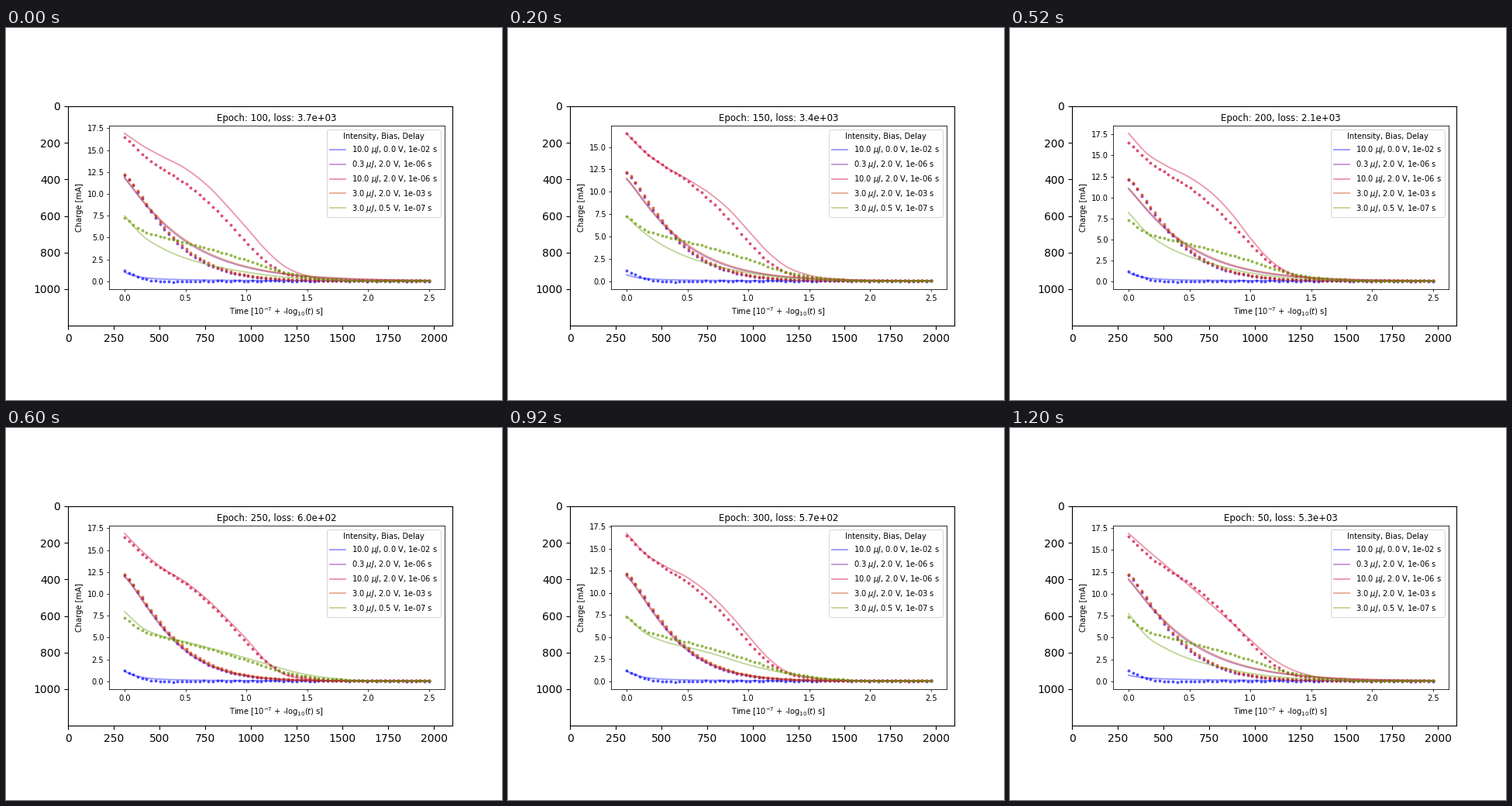
A matplotlib script for the animation above (1400 ms loop, 640x480 px).

```python
import numpy as np
import matplotlib.pyplot as plt
from matplotlib.animation import FuncAnimation
from matplotlib.ticker import MultipleLocator

W, H, DPI = 640, 480, 100
K = 496 / 2100 * 300 / DPI  # the inner chart is a 7 x 4 inch page shrunk to fit
SMALL, LARGE = 10 * K, 12 * K

EPOCHS = [100, 150, 200, 250, 300, 350, 50]
LOSSES = [3.7e3, 3.4e3, 2.1e3, 6.0e2, 5.7e2, 2.8e2, 5.3e3]
LABELS = [r"10.0 $\mu J$, 0.0 V, 1e-02 s", r"0.3 $\mu J$, 2.0 V, 1e-06 s",
          r"10.0 $\mu J$, 2.0 V, 1e-06 s", r"3.0 $\mu J$, 2.0 V, 1e-03 s",
          r"3.0 $\mu J$, 0.5 V, 1e-07 s"]
COLORS = plt.cm.brg(np.arange(5) / 5)

HIGH_KNOTS = [0, .15, .3, .5, .7, .85, 1, 1.15, 1.3, 1.5, 1.8, 2.5]
HIGH_DATA = [16.52, 14.5, 12.95, 11.2, 8.85, 6.75, 4.45, 2.35, 1.03, .43]
HIGH_FITS = [
    [16.92, 15.5, 14.35, 12.9, 10.7, 8.5, 6.15, 3.75, 1.85, .62],
    [16.5, 14.45, 12.95, 11.4, 9.65, 7.9, 5.65, 3.4, 1.75, .68],
    [17.63, 15.25, 13.85, 12.4, 10.3, 8.0, 5.15, 2.7, 1.15, .37],
    [16.92, 14.8, 13.05, 11.35, 9.1, 7.0, 4.85, 2.45, .88, .25],
    [16.75, 14.5, 13.15, 11.75, 9.65, 7.55, 5.15, 2.8, 1.2, .42],
    [16.8, 14.5, 12.95, 11.2, 8.95, 6.85, 4.55, 2.35, .97, .35],
    [16.9, 15.05, 13.3, 10.9, 8.5, 6.65, 4.75, 2.9, 1.6, .62],
]

LOW_KNOTS = [0, .15, .3, .5, .7, 1, 1.3, 1.5, 1.8, 2.5]
LOW_DATA = [7.3, 5.75, 5.1, 4.42, 3.7, 2.44, 1.07, .55]
LOW_FITS = [
    [7.5, 5.2, 3.85, 2.65, 1.86, 1.05, .5, .3],
    [7.23, 5.37, 4.0, 2.72, 1.86, .95, .43, .25],
    [8.2, 5.8, 4.25, 2.95, 2.02, 1.0, .46, .25],
    [7.97, 6.1, 5.2, 4.52, 3.8, 2.66, 1.42, .75],
    [7.37, 5.5, 4.55, 3.85, 3.15, 1.87, .93, .5],
    [7.34, 5.7, 4.92, 4.15, 3.45, 2.3, 1.2, .6],
    [7.7, 5.15, 3.8, 2.57, 1.8, .9, .42, .25],
]

# amplitude, time constant, exponent of the two middle decays
MID_FITS = [(11.8, .528, 1.085), (11.4, .48, 1.16), (11.0, .506, 1.113),
            (11.9, .428, 1.286), (11.85, .43, 1.28), (11.75, .422, 1.27),
            (11.6, .525, 1.1)]
# fast and slow amplitude of the bottom decay
BASE_FITS = [(.75, .3), (.5, .22), (.8, .25), (.92, .25), (.95, .25),
             (.95, .25), (.35, .35)]


def smooth(t, knots, values):
    """Cubic Hermite curve through the knots, with a fading tail."""
    x = np.array(knots)
    y = np.array(list(values) + [values[-1] * .3, .05])
    slope = np.gradient(y, x)
    i = np.clip(np.searchsorted(x, t, side="right") - 1, 0, len(x) - 2)
    h = x[i + 1] - x[i]
    u = (t - x[i]) / h
    return ((1 + 2 * u) * (1 - u) ** 2 * y[i] + u * (1 - u) ** 2 * h * slope[i]
            + u * u * (3 - 2 * u) * y[i + 1] + u * u * (u - 1) * h * slope[i + 1])


def decay(t, amp, tau, power):
    return amp * np.exp(-(t / tau) ** power) + .05 * np.tanh(t)


def measured(t):
    noise = np.random.default_rng(3).normal(0, .015, (5, len(t)))
    base = (1.2 * np.exp(-(t / .125) ** 1.35)
            - .09 * np.exp(-((t - .36) / .14) ** 2) + .04 * np.tanh(t))
    return noise + [base, decay(t, 12.1, .425, 1.286),
                    smooth(t, HIGH_KNOTS, HIGH_DATA),
                    decay(t, 12.22, .44, 1.286),
                    smooth(t, LOW_KNOTS, LOW_DATA)]


def fitted(t, i):
    fast, slow = BASE_FITS[i]
    amp, tau, power = MID_FITS[i]
    return [fast * np.exp(-t / .11) + slow * np.exp(-t / .9),
            decay(t, amp, tau * .99, power),
            smooth(t, HIGH_KNOTS, HIGH_FITS[i]),
            decay(t, amp + .1, tau * 1.015, power),
            smooth(t, LOW_KNOTS, LOW_FITS[i])]


fig = plt.figure(figsize=(W / DPI, H / DPI), dpi=DPI)

page = fig.add_subplot()
page.set(xlim=(-.5, 2099.5), ylim=(1199.5, -.5), aspect="equal",
         xticks=range(0, 2001, 250), yticks=range(0, 1001, 200))

left, right, top, bottom = 133.3, 565.5, 126.4, 337
ax = fig.add_axes([left / W, 1 - bottom / H, (right - left) / W, (bottom - top) / H])
ax.set_xlim(-.125, 2.625)
ax.xaxis.set_major_locator(MultipleLocator(.5))
ax.yaxis.set_major_locator(MultipleLocator(2.5))
ax.tick_params(labelsize=SMALL, length=3.5 * K, width=.8 * K, pad=3.5 * K)
for spine in ax.spines.values():
    spine.set_linewidth(.8 * K)
ax.set_xlabel(r"Time [$10^{-7}$ + -log$_{10}(t)$ s]", fontsize=SMALL, labelpad=4 * K)
ax.set_ylabel("Charge [mA]", fontsize=SMALL, labelpad=4 * K)
title = ax.set_title("", fontsize=LARGE, pad=6 * K)

t_dots = np.linspace(0, 2.5, 70)
t_line = np.linspace(0, 2.5, 250)
lines = []
for color, label, dots in zip(COLORS, LABELS, measured(t_dots)):
    ax.plot(t_dots, dots, ".", color=color, alpha=.6, ms=6 * K, mew=K)
    lines += ax.plot(t_line, 0 * t_line, color=color, alpha=.4, lw=1.9 * K, label=label)

legend = ax.legend(title="Intensity, Bias, Delay", loc="upper right",
                   fontsize=SMALL, title_fontsize=SMALL)
legend.get_frame().set_linewidth(K)


def update(i):
    for line, y in zip(lines, fitted(t_line, i)):
        line.set_ydata(y)
    low, high = -.05, max(HIGH_DATA[0], HIGH_FITS[i][0])
    pad = .05 * (high - low)
    ax.set_ylim(low - pad, high + pad)
    title.set_text(f"Epoch: {EPOCHS[i]}, loss: {LOSSES[i]:.1e}")
    return [*lines, title]


anim = FuncAnimation(fig, update, frames=len(EPOCHS), interval=200,
                     repeat=True, repeat_delay=0, blit=False)
plt.show()
```
